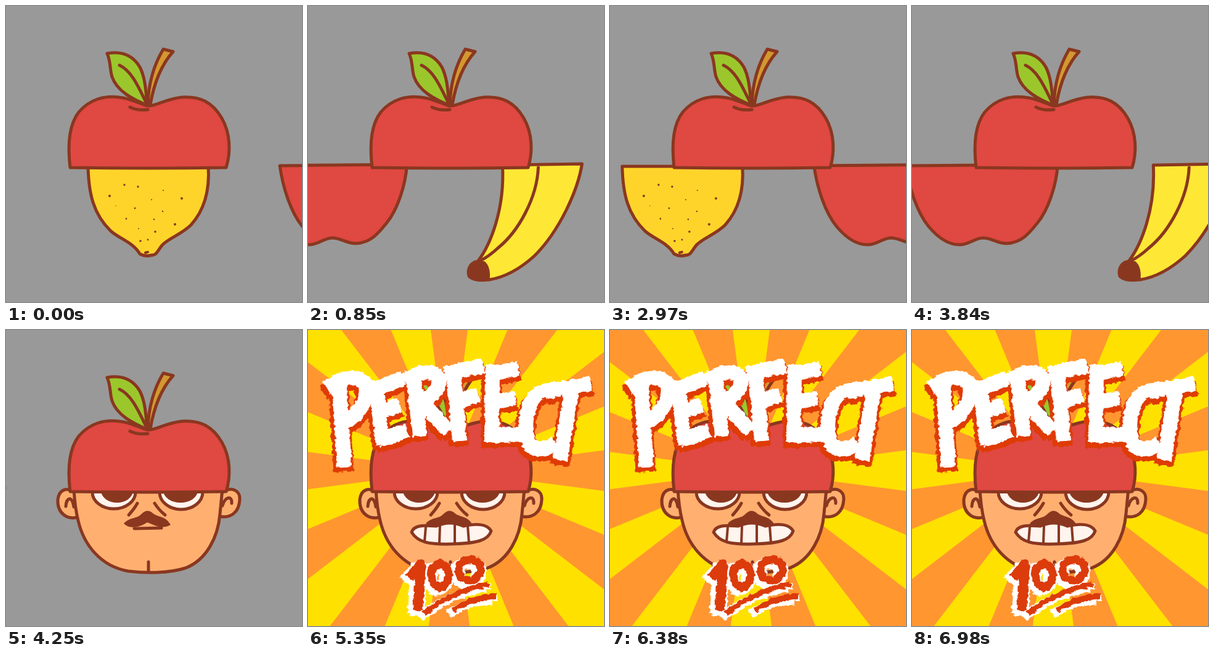
An HTML page that plays this animation: 480 px wide and 480 px high, repeating every 7110 ms.

```html
<!DOCTYPE html>
<html lang="en">
<head>
<meta charset="utf-8">
<title>Fruit match</title>
<style>
  html, body { margin: 0; width: 100%; height: 100%; overflow: hidden; background: #999; }
  svg { display: block; width: 100vw; height: 100vh; }
  .ink { stroke: #8a3720; stroke-width: 5; stroke-linecap: round; stroke-linejoin: round; fill: none; }
  .dark { fill: #8a3720; stroke: none; }
  .red { fill: #e04842; }
  .lemon { fill: #ffd42a; }
  .banana { fill: #ffe835; }
  .skin { fill: #ffb070; }
  .eye { fill: #fff4ee; }
  .stem { fill: #d3982f; }
  .leaf { fill: #9bc72c; }
  .thin { stroke-width: 4; }
  .brush { fill: none; stroke-linecap: butt; stroke-linejoin: round; }
</style>
</head>
<body>
<svg viewBox="0 0 480 480">
  <defs>
    <filter id="rough" filterUnits="userSpaceOnUse" x="0" y="0" width="480" height="480" color-interpolation-filters="sRGB">
      <feTurbulence type="fractalNoise" baseFrequency=".12 .16" numOctaves="2" seed="4"/>
      <feDisplacementMap in="SourceGraphic" scale="7" xChannelSelector="R" yChannelSelector="G"/>
    </filter>
    <clipPath id="lids"><path d="M100 262H360V300H100Z"/></clipPath>
    <g id="word">
      <!-- P E R F E C T -->
      <path d="M50 80 59 222M30 94Q62 72 83 79Q100 88 92 113Q84 136 58 150"/>
      <path d="M109 82 122 186M104 98 155 78M114 134 149 121M114 179 161 163"/>
      <path d="M171 66 181 172M157 83Q185 63 204 70Q219 79 208 97Q197 111 178 119M183 116 229 164"/>
      <path d="M235 58 246 180M222 71 284 58M238 117 276 105"/>
      <path d="M299 56 298 182M290 73 341 62M298 117 336 111M288 171 344 169"/>
      <path d="M402 101Q374 91 361 118Q347 154 358 183Q370 202 402 184"/>
      <path d="M384 99 459 87M429 86 409 211"/>
    </g>
    <g id="score">
      <path d="M164 402 183 380 178 455" stroke-width="16"/>
      <ellipse cx="214" cy="398" rx="14" ry="19" stroke-width="13"/>
      <ellipse cx="262" cy="389" rx="18" ry="17" stroke-width="13"/>
      <path d="M188 460Q232 424 293 412" stroke-width="9"/>
      <path d="M235 454Q268 433 304 432" stroke-width="9"/>
    </g>
    <g id="head">
      <path class="ink skin" d="M113 266C100 253 86 258 84 275C83 297 99 309 118 303M349 265C365 252 380 260 379 275C378 296 364 306 346 302"/>
      <path class="ink skin" d="M110 257C111 277 113 293 117 309C126 348 153 383 198 391C230 395 266 394 291 386C325 373 344 336 347 298L351 257Z"/>
      <path class="ink" d="M97 286C98 272 107 267 110 287M351 285C354 271 367 267 366 281"/>
      <g clip-path="url(#lids)">
        <ellipse class="ink eye" cx="175" cy="263" rx="35" ry="27"/>
        <ellipse class="ink eye" cx="284" cy="263" rx="35" ry="28"/>
        <ellipse class="dark" cx="180" cy="260" rx="26" ry="20"/>
        <ellipse class="dark" cx="283" cy="260" rx="28" ry="20"/>
      </g>
      <path class="ink" d="M213 281Q208 290 199 300M241 281Q248 292 258 300M231 376V391"/>
      <path class="dark" d="M191 314C200 303 212 307 220 298Q229 289 238 297C246 304 259 301 267 316C252 324 240 316 229 312C215 321 200 323 191 314Z"/>
    </g>
    <g id="hat">
      <path class="ink red" d="M104 262C99 220 104 190 118 172C135 152 160 143 190 149C206 152 218 159 230 162C245 162 258 151 285 148C315 146 335 156 350 182C365 208 364 240 357 262Q230 264 104 262Z"/>
      <path class="ink" d="M201 164Q212 170 230 168"/>
      <path class="ink stem" d="M230 160C231 125 240 95 255 70L271 74C252 95 240 125 234 160Z"/>
      <path class="ink leaf" d="M164 77C186 73 205 79 217 99C226 116 227 140 229 161C205 151 180 138 172 115C168 102 170 90 164 77Z"/>
      <path class="ink" d="M184 96C205 106 216 134 228 158"/>
    </g>
  </defs>

  <g id="game">
    <rect width="480" height="480" fill="#999"/>
    <g id="strip">
      <path class="ink lemon" d="M133 260H328C331 305 318 335 300 355C285 370 265 376 254 387C246 396 245 404 236 404Q226 407 217 402C207 384 185 378 170 365C142 338 134 305 133 260Z"/>
      <g id="seeds" class="dark"></g>
      <path class="ink thin" d="M226 400 230 399"/>
      <path class="ink red" d="M444 259C449 295 462 335 481 358C498 378 516 388 533 387C548 386 555 376 570 376C585 377 592 385 607 385C632 384 645 367 657 352C675 330 688 290 690 257Z"/>
      <g transform="translate(587)">
        <path class="ink banana" d="M258 258 387 256C380 300 350 365 310 405C288 425 262 440 236 444L218 414C238 388 262 330 258 258Z"/>
        <path class="ink" d="M316 262C314 310 285 365 250 393Q236 406 222 413"/>
        <path class="dark" d="M216 412C203 414 197 429 202 440C210 448 225 448 237 446C239 430 236 420 229 414Z"/>
      </g>
      <g transform="translate(976)">
        <use href="#head"/>
        <path class="ink" d="M208 322 252 321"/>
      </g>
    </g>
    <use href="#hat"/>
  </g>

  <g id="win" visibility="hidden">
    <rect id="sky" width="480" height="480"/>
    <path id="rays"/>
    <use href="#head"/>
    <path class="ink eye" d="M168 328C172 315 190 317 208 318Q230 308 252 318C275 313 291 315 297 326C292 341 275 346 232 347C195 348 178 344 168 328Z"/>
    <path class="ink thin" d="M191 319 189 343M214 318 213 346M238 316V346M259 318 261 345"/>
    <use href="#hat"/>
    <g class="brush" filter="url(#rough)" aria-label="PERFECT 100">
      <g stroke="#df3b05" stroke-width="25">
        <use href="#word" x="-5" y="8"/>
        <use href="#word" x="3" y="8"/>
      </g>
      <use href="#word" stroke="#fff" stroke-width="24"/>
      <g stroke="#fff">
        <use href="#score" x="-9" y="4"/>
        <use href="#score" x="-5" y="8"/>
        <use href="#score" x="3" y="3"/>
      </g>
      <use href="#score" stroke="#dc3b0c"/>
    </g>
  </g>
</svg>
<script>
  const LOOP = 7110, STEP = 30, WIN_AT = 4880;
  const YELLOW = '#ffe100', ORANGE = '#ff9630';
  const LEMON = 0, APPLE = 336, BANANA = 663, FACE = 976;
  const $ = id => document.getElementById(id);

  // start, steps, from, to, ease-out power
  const slides = [
    [700, 10, LEMON, BANANA, 1.75],
    [1940, 11, BANANA, LEMON, 1.3],
    [2970, 10, LEMON, APPLE, 3.9],
    [3840, 5, APPLE, BANANA, 2],
    [4130, 5, BANANA, FACE, 2]
  ];

  // x, y, radius
  const seeds = [
    [192, 290, 1.7], [214, 293, 1.7], [255, 299, 1], [285, 312, 2], [168, 308, 2], [178, 324, .7],
    [236, 314, 1], [209, 328, 1.4], [254, 333, 1.2], [195, 345, 1.4], [240, 346, 1.3],
    [274, 354, 2.1], [215, 361, 1], [242, 366, 1.8], [218, 381, 1.8], [230, 379, 1.4]
  ];
  $('seeds').innerHTML = seeds.map(([x, y, r]) => `<circle cx="${x}" cy="${y}" r="${r}"/>`).join('');

  const HUB_X = 229, HUB_Y = 228;
  const rayPoint = deg => {
    const a = deg * Math.PI / 180;
    return `${HUB_X + 600 * Math.sin(a)} ${HUB_Y - 600 * Math.cos(a)}`;
  };
  let rays = '';
  for (let a = 0; a < 360; a += 30) {
    rays += `M${HUB_X} ${HUB_Y}L${rayPoint(a - 7.5)}L${rayPoint(a + 7.5)}Z`;
  }
  $('rays').setAttribute('d', rays);

  function scrollAt(t) {
    let x = LEMON;
    for (const [start, steps, from, to, power] of slides) {
      if (t < start) break;
      const p = Math.min(1, (Math.floor((t - start) / STEP) + 1) / steps);
      x = from + (to - from) * (1 - (1 - p) ** power);
    }
    return x;
  }

  function draw(t) {
    const won = t >= WIN_AT;
    $('game').setAttribute('visibility', won ? 'hidden' : 'visible');
    $('win').setAttribute('visibility', won ? 'visible' : 'hidden');
    if (won) {
      const swap = (t - WIN_AT) % 300 >= 170;
      $('sky').setAttribute('fill', swap ? YELLOW : ORANGE);
      $('rays').setAttribute('fill', swap ? ORANGE : YELLOW);
    } else {
      $('strip').setAttribute('transform', `translate(${-scrollAt(t)})`);
    }
  }

  const begin = performance.now();
  function tick() {
    draw((performance.now() - begin) % LOOP);
    requestAnimationFrame(tick);
  }
  tick();
</script>
</body>
</html>
```
